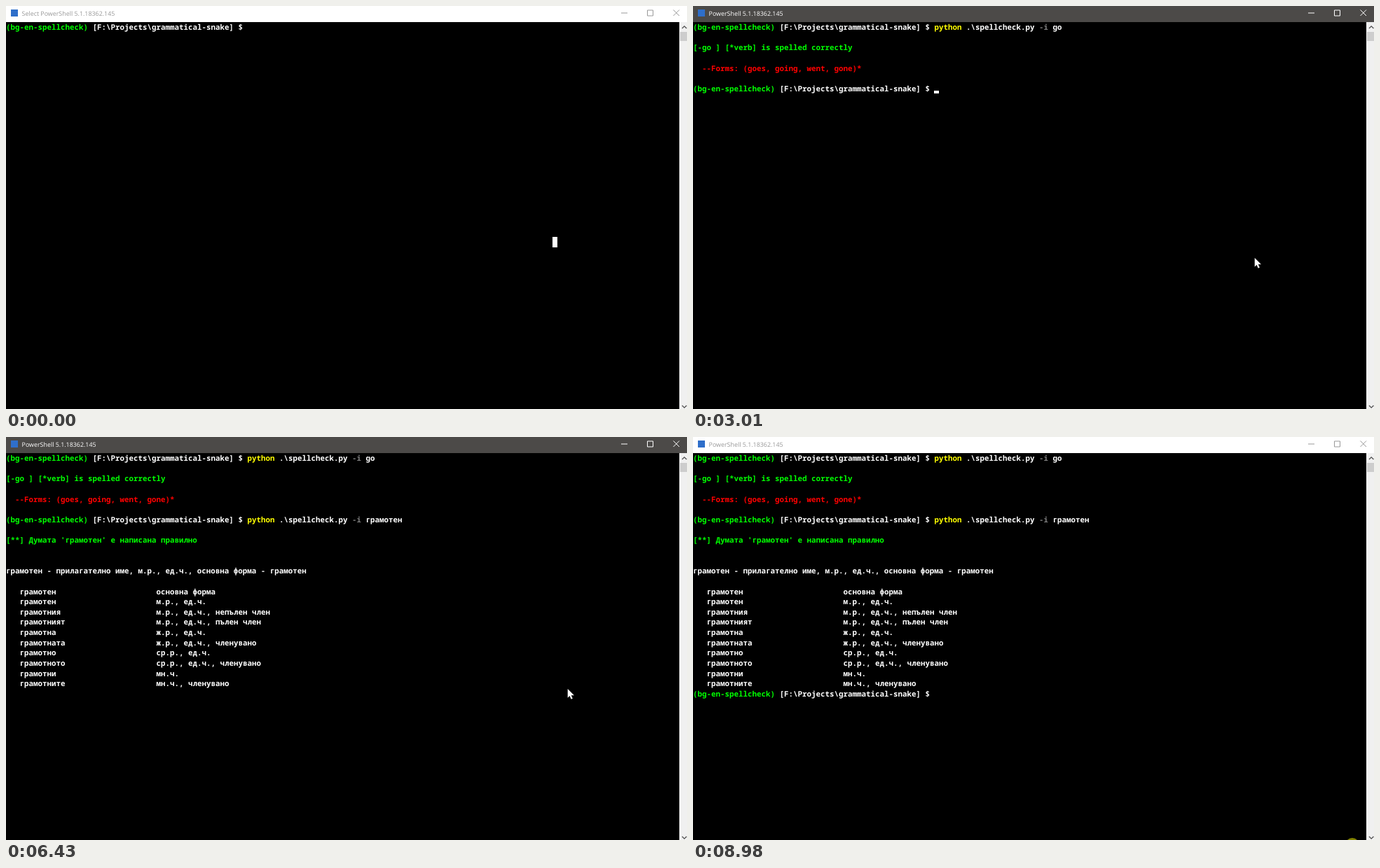
Write an HTML page that moves like this. It is 972x576 px and loops after 9.06 s.

```html
<!DOCTYPE html>
<html lang="en">
<head>
<meta charset="utf-8">
<title>Terminal spell check</title>
<style>
  html, body { margin: 0; width: 100%; height: 100%; overflow: hidden; background: #000; }
  svg { display: block; }
  text { white-space: pre; text-rendering: geometricPrecision; }
  #screen text { font: bold 10.8333px "Noto Sans Mono", "DejaVu Sans Mono", monospace; fill: #fff; }
  #title { font: 8.9px "Open Sans", "Noto Sans", sans-serif; }
  #screen .lime { fill: #0f0; }
  #screen .red { fill: #f00; }
  #screen .yellow { fill: #ff0; }
  #screen .gray { fill: #808080; }
  #bar { --back: #fff; --ink: #999; }
  #bar.active { --back: #4c4a48; --ink: #fff; }
  #back { fill: var(--back); }
  #title { fill: var(--ink); }
  #buttons { fill: none; stroke: var(--ink); }
  .chevron { fill: none; stroke: #505050; stroke-width: 1.3; }
</style>
</head>
<body>
<svg width="972" height="576" viewBox="0 0 972 576">
  <rect width="972" height="576"/>
  <g id="bar">
    <rect id="back" width="972" height="23"/>
    <rect x="7" y="5" width="10" height="10" fill="#2f6fca"/>
    <text id="title" x="22.6" y="13.5"></text>
    <g id="buttons">
      <path d="M878 10h9M915.5 6h8v8h-8z"/>
      <path d="M952.5 5.5l8.5 8.5m0-8.5l-8.5 8.5"/>
    </g>
  </g>
  <g id="scrollbar">
    <rect x="961" y="23" width="11" height="553" fill="#f0f0f0"/>
    <rect x="962" y="37" width="10" height="13" fill="#cdcdcd"/>
    <path class="chevron" d="M965 32l3.2-3.2 3.2 3.2M965 571l3.2 3.2 3.2-3.2"/>
  </g>
  <g id="screen"></g>
  <rect id="selection" x="780" y="330" width="7" height="15" fill="#fff"/>
  <rect id="caret" height="4" fill="#fff"/>
  <circle id="press" r="10" fill="#808000"/>
  <path id="pointer" d="M0 0V12.7L2.9 10 4.9 14.8 7.1 13.8 5 9.2H9.2Z"
        fill="#fff" stroke="#000" stroke-width="1.4" paint-order="stroke"/>
</svg>
<script>
const LOOP = 9060, COL = 6.5, ROW = 14.64;
const BLINK = 1050, BLINK_OFF = 1910;
const INPUT = 53, WORD = 79;
const SVG = 'http://www.w3.org/2000/svg';
const $ = id => document.getElementById(id);
const runs = [], words = [], moves = [];

// One run of text on the character grid, visible from the given time.
function put(from, row, col, str, color = '') {
  const el = document.createElementNS(SVG, 'text');
  el.setAttribute('x', col * COL);
  el.setAttribute('y', Math.round(34.2 + ROW * row));
  el.setAttribute('class', color);
  el.textContent = str;
  $('screen').append(el);
  runs.push({ from, el });
  return el;
}

const moveCaret = (from, row, col) => moves.push({ from, row, col });
const hideCaret = from => moves.push({ from, hidden: true });

function prompt(from, row) {
  put(from, row, 0, '(bg-en-spellcheck)', 'lime');
  put(from, row, 19, '[F:\\Projects\\grammatical-snake] $');
  moveCaret(from, row, INPUT);
}

function command(from, row, word) {
  put(from, row, INPUT, 'python', 'yellow');
  put(from, row, 60, '.\\spellcheck.py');
  put(from, row, 76, '-i', 'gray');
  moveCaret(from, row, WORD + word.length);
  return put(from, row, WORD, word);
}

function type(from, row, word) {
  words.push({ from, word });
  moveCaret(from, row, WORD + word.length);
}

prompt(0, 0);
hideCaret(0);
command(1080, 0, 'go');
hideCaret(1400);
moveCaret(1620, 1, 0);
hideCaret(2930);
put(2930, 2, 0, '[-go ] [*verb] is spelled correctly', 'lime');
put(2930, 4, 2, '--Forms: (goes, going, went, gone)*', 'red');

prompt(3010, 6);
const typed = command(3880, 6, 'go');
type(0, 6, 'go');
moves.pop();
type(4400, 6, 'g');
type(4630, 6, '');
const stem = 'грамот', adjective = stem + 'ен';
for (let n = 1; n <= adjective.length; n++) type(4610 + 130 * n, 6, adjective.slice(0, n));
moveCaret(6040, 7, 0);
hideCaret(6430);

put(6430, 8, 0, `[**] Думата '${adjective}' е написана правилно`, 'lime');
put(6430, 11, 0, `${adjective} - прилагателно име, м.р., ед.ч., основна форма - ${adjective}`);
[
  ['ен', 'основна форма'],
  ['ен', 'м.р., ед.ч.'],
  ['ния', 'м.р., ед.ч., непълен член'],
  ['ният', 'м.р., ед.ч., пълен член'],
  ['на', 'ж.р., ед.ч.'],
  ['ната', 'ж.р., ед.ч., членувано'],
  ['но', 'ср.р., ед.ч.'],
  ['ното', 'ср.р., ед.ч., членувано'],
  ['ни', 'мн.ч.'],
  ['ните', 'мн.ч., членувано']
].forEach(([ending, form], i) => {
  put(6430, 13 + i, 3, stem + ending);
  put(6430, 13 + i, 33, form);
});
prompt(6510, 23);
hideCaret(8980);

const latest = (list, t) => list.findLast(item => item.from <= t);
const progress = (t, from, to) => Math.min(1, Math.max(0, (t - from) / (to - from)));
const mix = (a, b, f) => a + (b - a) * f;

function show(el, on) { el.style.display = on ? '' : 'none'; }

// The pointer glides in from below, rests, then speeds up and leaves.
function pointerAt(t) {
  if (t < 7670) {
    const f = 1 - (1 - progress(t, 0, 300)) ** 1.5;
    return [mix(941, 801.7, f), mix(583, 360, f)];
  }
  const u = progress(t, 7670, 8520);
  return [mix(801.7, 909, u ** 1.8), mix(360, 579, u ** 1.68)];
}

// A move shows the caret at once; otherwise it follows a steady blink.
function drawCaret(t) {
  const { from, row, col, hidden } = latest(moves, t);
  const sinceOff = (t - BLINK_OFF + 2 * BLINK) % BLINK;
  const on = !hidden && (sinceOff >= BLINK / 2 || t - from < sinceOff);
  const caret = $('caret');
  show(caret, on);
  if (!on) return;
  const x = Math.floor(col * COL);
  caret.setAttribute('x', x);
  caret.setAttribute('width', Math.floor((col + 1) * COL) - x);
  caret.setAttribute('y', Math.round(33 + ROW * row));
}

function draw(t) {
  const leaving = t >= 8980;
  $('bar').classList.toggle('active', t >= 300 && !leaving);
  $('title').textContent = (t < 840 ? 'Select ' : '') + 'PowerShell 5.1.18362.145';
  show($('selection'), t < 760);

  runs.forEach(({ from, el }) => show(el, t >= from));
  typed.textContent = latest(words, t).word;
  drawCaret(t);

  show($('pointer'), t >= 70);
  $('pointer').setAttribute('transform', `translate(${pointerAt(t)})`);
  show($('press'), leaving || (t >= 300 && t < 380));
  $('press').setAttribute('transform', leaving ? 'translate(941 583)' : 'translate(801 359)');
}

const start = performance.now();
function tick() {
  draw((performance.now() - start) % LOOP);
  requestAnimationFrame(tick);
}
tick();
</script>
</body>
</html>
```
